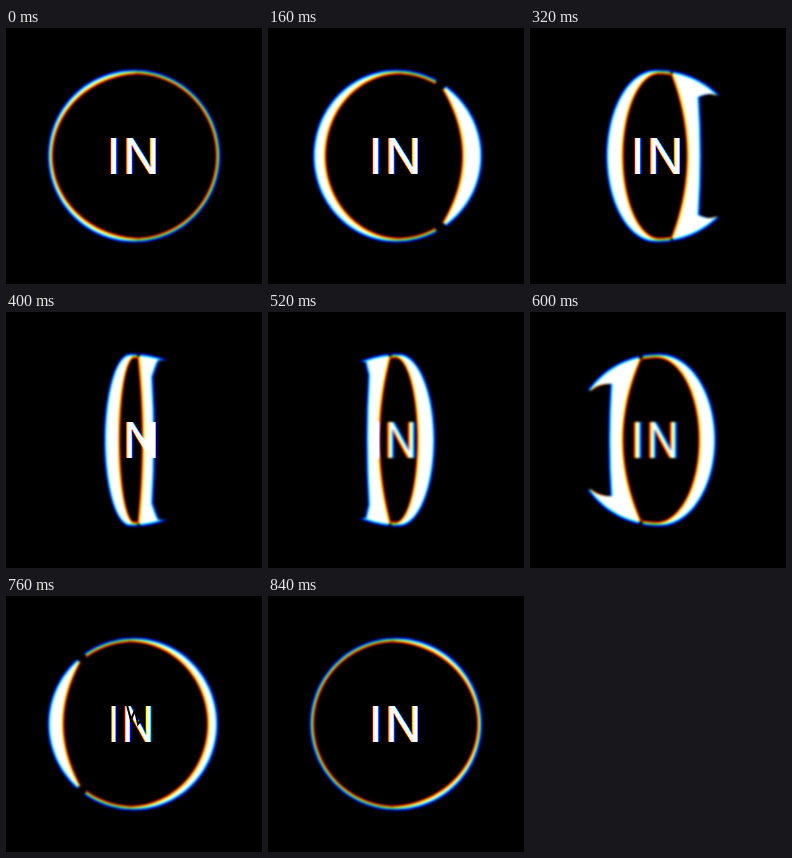
Animation, 256 px wide and 256 px high, one loop 880 ms. Source, as an HTML page with a canvas:

```html
<!DOCTYPE html>
<html>
<head>
<meta charset="utf-8">
<style>
  html, body { margin: 0; height: 100%; background: #000; overflow: hidden; }
  canvas { display: block; width: 256px; height: 256px; }
</style>
</head>
<body>
<canvas id="stage" width="256" height="256"></canvas>
<script>
const LOOP = 880, STEP = 40, MIRROR = 447.5, R = 85.2, INNER = 83;
const ctx = document.getElementById('stage').getContext('2d');
const layer = document.createElement('canvas');
layer.width = layer.height = 256;
const lc = layer.getContext('2d');

// colour, edge spread, text shift
const CHANNELS = [['#f00', -1.3, -0.7], ['#0f0', 0, 0], ['#00f', 1.5, 0.7]];

// time, far outer, far inner, near inner, pinch angle, notch corner x, y, notch middle, notch angle
const KEYS = [
  [0,   85.2, 82.2, 83.2, 20, 88, 0,  88, 0],
  [55,  85,   82.2, 83,   25, 88, 0,  88, 0],
  [80,  85,   81,   80,   38, 88, 0,  88, 0],
  [160, 82,   71,   67,   58, 88, 0,  88, 0],
  [215, 75,   62,   53,   69, 73, 30, 74, 0],
  [240, 70,   55,   48,   73, 60, 50, 62, 14],
  [375, 38,   22,   17,   86, 27, 65, 29, 69],
  [400, 29,   15,   9,    87, 18, 63, 20, 73],
  [448, 13,   -1,   -1,   90, 13, 70, 13, 81]
];

const rad = d => d * Math.PI / 180;

function pose(u) {
  let i = 0;
  while (i < KEYS.length - 2 && u > KEYS[i + 1][0]) i++;
  const a = KEYS[i], b = KEYS[i + 1], k = (u - a[0]) / (b[0] - a[0]);
  return a.map((v, j) => v + (b[j] - v) * k);
}

// Closed outline from a left and a right edge, each a function of y
function outline(radius, left, right) {
  const n = 60;
  lc.beginPath();
  for (let i = 0; i <= 2 * n; i++) {
    const y = -radius * Math.cos(Math.PI * i / n);
    lc.lineTo((i <= n ? right : left)(y), y);
  }
  lc.fill();
}

const halfWidth = (y, r) => Math.sqrt(Math.max(0, 1 - (y / r) ** 2));

function drawBand(u, flip, color, e) {
  const [, fo, fi, ni, pinch, tx, ty, nc, notch] = pose(u);
  lc.setTransform(1, 0, 0, 1, 0, 0);
  lc.globalCompositeOperation = 'source-over';
  lc.clearRect(0, 0, 256, 256);
  lc.setTransform(flip, 0, 0, 1, 128, 128);
  lc.fillStyle = color;

  const ro = R + e, ri = INNER + e;
  const ox = -6 * (1 - fo / R);
  outline(ro, y => ox - (fo + e + ox) * halfWidth(y, ro), y => ro * halfWidth(y, ro));

  lc.globalCompositeOperation = 'destination-out';
  const gx = 84 * Math.cos(rad(pinch)), gy = 84 * Math.sin(rad(pinch)), hx = gx * 0.1;
  const near = y => ni + e + (gx - ni) * (y / gy) ** 2;
  const left = y => hx - (fi + e + hx) * halfWidth(y, ri);
  outline(ri, left, y => Math.max(left(y), Math.min(ri * halfWidth(y, ri), near(y))));

  if (u > 100) {
    const dot = Math.max(1.5, 5.5 - Math.abs(u - 160) / 40);
    for (const s of [-1, 1]) {
      lc.beginPath();
      lc.arc(gx * 1.01, s * gy * 1.01, dot, 0, 7);
      lc.fill();
    }
  }

  if (u > 160) {
    const px = 83.5 * Math.cos(rad(notch)) + e, py = 83.5 * Math.sin(rad(notch));
    const x = tx + e, cx = (px + x) / 2 * 1.05, cy = (py + ty) / 2 * 1.07;
    lc.beginPath();
    lc.moveTo(px, -py);
    lc.quadraticCurveTo(cx, -cy, x, -ty);
    lc.quadraticCurveTo(2 * (nc + e) - x, 0, x, ty);
    lc.quadraticCurveTo(cx, cy, px, py);
    lc.lineTo(200, py);
    lc.lineTo(200, -py);
    lc.fill();
  }
}

function letter(ch, x, scale) {
  ctx.save();
  ctx.translate(x, 146);
  ctx.scale(scale, 1);
  ctx.fillText(ch, 0, 0);
  ctx.restore();
}

function draw(time) {
  let t = Math.floor(time % LOOP / STEP) * STEP;
  if (t < 80) t = 0;
  const flip = t < MIRROR ? 1 : -1;
  const u = flip > 0 ? t : 2 * MIRROR - t;
  const soft = t >= 480 && t <= 600, cut = t >= 640 && t <= 760;

  ctx.globalCompositeOperation = 'source-over';
  ctx.fillStyle = '#000';
  ctx.fillRect(0, 0, 256, 256);
  ctx.globalCompositeOperation = 'lighter';
  ctx.font = '500 49px Inter, "Liberation Sans", sans-serif';
  ctx.textAlign = 'center';
  for (const [color, spread, shift] of CHANNELS) {
    drawBand(u, flip, color, spread);
    ctx.filter = 'blur(0.9px)';
    ctx.drawImage(layer, 0, 0);
    ctx.filter = soft ? 'blur(1.2px)' : 'blur(0.4px)';
    ctx.fillStyle = color;
    const dx = soft ? shift * 2 : shift;
    letter('I', 107.8 + dx, cut ? 0.75 : 1);
    letter('N', (soft ? 133 : cut ? 132 : 135.2) + dx, soft || cut ? 0.88 : 1);
  }
  ctx.filter = 'none';
  ctx.globalCompositeOperation = 'source-over';

  if (cut) {
    ctx.strokeStyle = '#000';
    ctx.lineWidth = 2;
    ctx.beginPath();
    for (const [x, y] of [[121, 109], [125, 124], [129, 114], [132, 128], [137, 122]]) ctx.lineTo(x, y);
    ctx.stroke();
  }
}

const start = performance.now();
function tick() {
  draw(performance.now() - start);
  requestAnimationFrame(tick);
}
tick();
</script>
</body>
</html>
```
